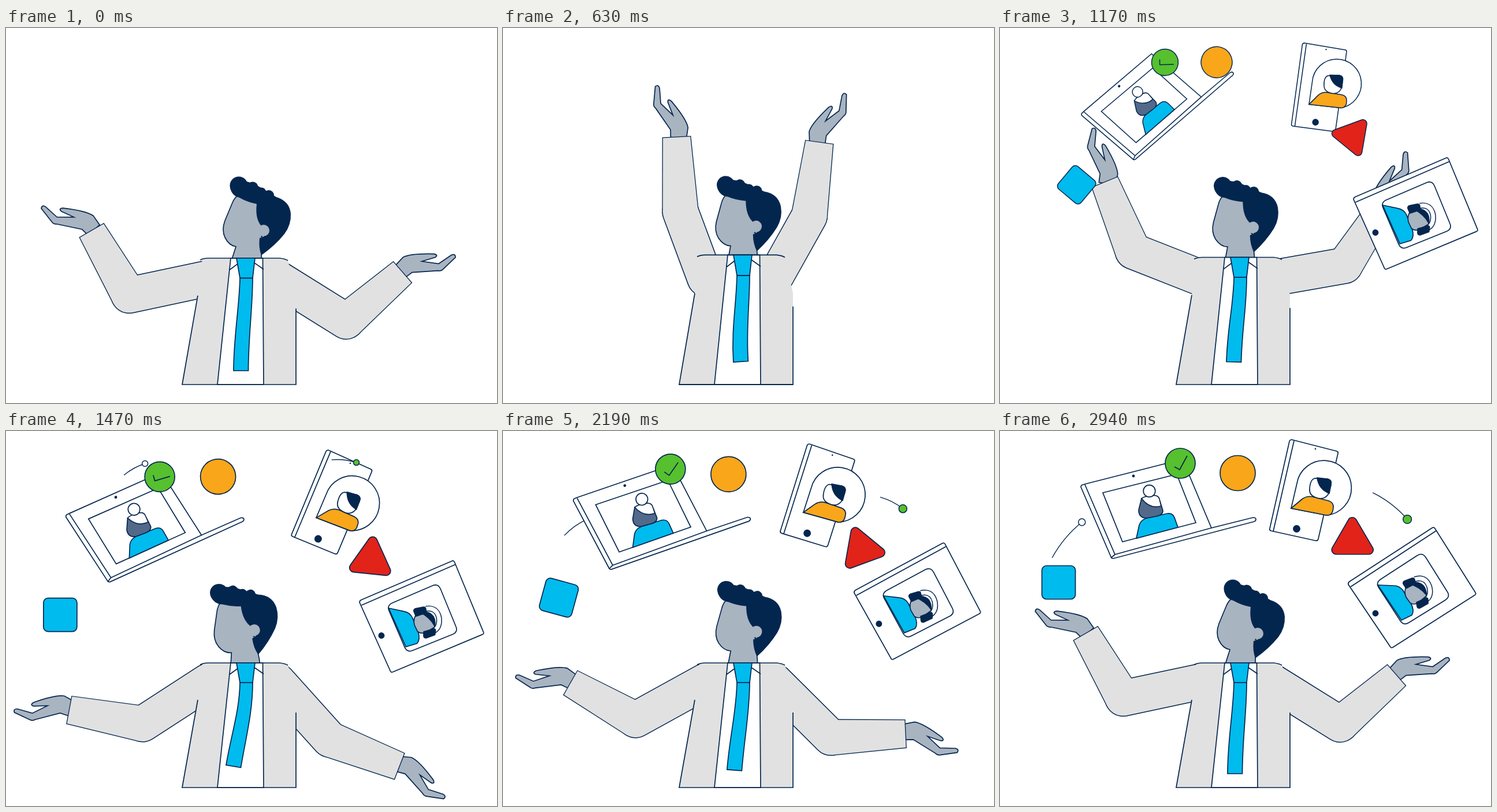
An HTML page with a canvas that plays this animation: 850x650 px, repeating every 4.5 s.

```html
<!DOCTYPE html>
<html lang="en">
<head>
<meta charset="utf-8">
<title>Juggling devices</title>
<style>
html, body { margin: 0; width: 100%; height: 100%; overflow: hidden; background: #fff; }
canvas { display: block; }
</style>
</head>
<body>
<canvas id="stage" width="850" height="650"></canvas>
<script>
const ctx = document.getElementById('stage').getContext('2d');
const NAVY = '#03264f', COAT = '#e1e1e1', SKIN = '#a9b4c1', CYAN = '#00bbee', ORANGE = '#faa61a',
  GREEN = '#56c02f', RED = '#e1231a', SLATE = '#53698a', WHITE = '#fff';
const LOOP = 4500, STEP = 30, END = 2940, LINE = 1.7;
const PIVOT = { x: 425, y: 335 };  // centre of the ring of floating things

const rad = degrees => degrees * Math.PI / 180;
const mix = (a, b, u) => a + (b - a) * u;
const ramp = (t, from, to) => Math.min(1, Math.max(0, (t - from) / (to - from)));
const ease = (t, from, to) => (1 - Math.cos(Math.PI * ramp(t, from, to))) / 2;
const bump = (t, from, to) => Math.sin(Math.PI * ramp(t, from, to)) ** 2;

// Arm gestures; each joint further out follows a little later.
const rise = (t, joint = 0) => ease(t, 200 + 60 * joint, 720 + 60 * joint);
const fall = (t, joint = 0) => ease(t, 930 + 60 * joint, 1410 + 60 * joint);
const spread = t => 1 - ease(t, 1580, 2760);

function shape(d, fill, line = LINE) {
  const path = typeof d === 'string' ? new Path2D(d) : d;
  if (fill) { ctx.fillStyle = fill; ctx.fill(path); }
  if (line) { ctx.strokeStyle = NAVY; ctx.lineWidth = line; ctx.stroke(path); }
}
function disc(x, y, r, fill, line = LINE) {
  const path = new Path2D();
  path.arc(x, y, r, 0, 7);
  shape(path, fill, line);
}
function group(draw) { ctx.save(); draw(); ctx.restore(); }

// Person
function drawHead(angle, lift) {
  group(() => {
    ctx.translate(415, 412 - lift);
    ctx.rotate(rad(angle));
    ctx.translate(-415, -412);
    shape('M404 288Q395 294 391 305L379 334Q373 350 379 363Q386 377 398 379L390 404L393 418H440L442 400L445 300Z', SKIN);
    disc(403, 273, 15.5, NAVY, 0);
    disc(427, 276, 9.5, NAVY, 0);
    disc(442, 285, 8.5, NAVY, 0);
    disc(455, 290, 9, NAVY, 0);
    shape('M388 277Q391 291 404 294Q418 302 434 305Q431 329 441 342L446 362L439 364Q437 380 442 394Q466 377 482 357Q494 341 493 322Q491 300 468 293L430 270L403 262Z', NAVY, 0);
    disc(446, 351, 10, SKIN, 0);
    shape('M441 361Q444 363 448 362', null, 1);
  });
}

function drawTorso(top, tie) {
  const k = (618 - top) / 216;
  group(() => {
    ctx.translate(0, 618);
    ctx.scale(1, k);
    ctx.translate(0, -618);
    shape('M340 402H475L488 405L502 466V618H305L332 466Z', COAT, 0);
    shape('M389 402H444.5L446 618H366Z', WHITE);
    shape('M336 405Q342 402 350 402H474Q483 403 488 406M332 466L305 618H502V488');
    shape('M387 422L402 411M430 410L446 421');
  });
  // The tail hangs square to its hem, which tilts as it swings.
  const knot = 618 - 182 * k, { x, y } = tie, tilt = (394 - x) / 3;
  const cx = x + tilt * 2.3, cy = y - 58;
  shape(`M405 ${knot}C404 ${knot + 50} ${cx} ${cy} ${x} ${y}L${x + 25.5} ${y + tilt}` +
    `C${cx + 25.5} ${cy + tilt} 427 ${knot + 50} 427 ${knot}Z`, CYAN);
  shape(`M399 ${top}H431L427 ${knot}H405Z`, CYAN);
}

// Joint angles in degrees: [at rest, raised, spread out] for upper arm, forearm and hand
const arms = [
  { side: -1, x: 350, joints: [[12, -76, 33], [-60, -93.5, -10], [-25, -92, 5]] },
  { side: 1, x: 470, joints: [[32, -68, 48], [-41, -92, 22], [-17, -86, 40]] }
];
const DIP = [0, 35, 25], RETURN = [1850, 1400, 1450];
const HAND = 'M-12 -12L1 -26Q14 -33 55 -32Q63 -30 57 -26L34 -19L63 -15L85 -30Q92 -33 92 -26L70 -5Q67 -2 62 -3L17 0L5 9Z';

function jointAngle([rest, up, out], joint, t) {
  const gesture = mix(mix(rest, up, rise(t, joint)), out, fall(t, joint));
  return rad(mix(gesture, rest, ramp(t, RETURN[joint], END) ** 1.4) + DIP[joint] * bump(t, 0, 400));
}

function drawArm({ side, x, joints }, t, raised) {
  const [upper, fore, hand] = joints.map((joint, i) => jointAngle(joint, i, t));
  const length = 140 - 18 * raised - 5 * fall(t) * spread(t);
  const ex = length * Math.cos(upper), ey = length * Math.sin(upper);
  const fx = Math.cos(fore), fy = Math.sin(fore);
  const wx = ex + 129 * fx, wy = ey + 129 * fy;
  const corner = (cx, cy, r) => `${cx - fy * r} ${cy + fx * r}`;
  const sleeve = new Path2D(`M${corner(ex, ey, 30.5)}L${corner(wx, wy, 23.7)}L${corner(wx, wy, -23.7)}L${corner(ex, ey, -30.5)}Z`);
  const bone = new Path2D(`M0 0L${ex} ${ey}`);
  const limb = (color, width) => {
    ctx.strokeStyle = color;
    ctx.lineWidth = width;
    ctx.lineCap = 'round';
    ctx.stroke(bone);
  };
  group(() => {
    ctx.translate(x, 434);
    ctx.scale(side, 1);
    group(() => {
      ctx.translate(wx, wy);
      ctx.rotate(hand + rad(17));
      shape(HAND, SKIN);
    });
    shape(sleeve, COAT, 2.6);
    limb(NAVY, 64);
    limb(COAT, 61);
    ctx.fillStyle = COAT;
    ctx.fill(sleeve);
  });
}

function drawPerson(t) {
  const raised = rise(t) * (1 - fall(t)), out = fall(t) * spread(t), nod = bump(t, 0, 840);
  drawHead(-14.5 * (nod + out), 4 * raised);
  arms.forEach(arm => drawArm(arm, t, raised));
  drawTorso(399 - 6 * rise(t) + 9 * fall(t),
    { x: 394 + 9 * raised - 13 * out - 7 * nod, y: 594 - 16 * raised - 15 * out });
}

// Devices and tokens, drawn in their resting places
function drawLaptop() {
  shape('M141 94L147 92L316 49L366 168L438 150Q443 150 443 153Q443 156 440 157L196 221Q193 221 192 218L140 97Z', WHITE);
  shape('M147 93L199 214L366 168M192 220L199 214');
  shape('M178 107L306 75L339 159L212 192Z', WHITE);
  disc(231, 78, 2.4, NAVY, 0);
  shape('M236 186L241 163Q244 154 254 151L290 143Q299 142 302 150L308 167Z', CYAN);
  shape('M245 117L240 137Q240 151 254 151L270 148Q282 146 282 138L277 122Z', SLATE);
  shape('M245 117Q250 113 262 112Q274 110 276 118L279 130Q260 136 245 117Z', WHITE);
  disc(258.5, 104, 10.3, WHITE);
}
function drawPhone() {
  shape('M505 15L583 35Q586 36 585 39L551 187Q550 191 546 190L469 173Q466 172 467 169L501 18Q502 15 505 15Z', WHITE);
  shape('M509 17L473 174');
  disc(546, 31, 1.3, NAVY, 0);
  disc(513.5, 169.5, 5.6, NAVY);
  shape('M504 134L514 91A47.5 47.5 0 1 1 565 146Z', WHITE);
  shape('M504 134L523 118Q531 112 541 114L569 121Q578 124 577 133L576 139Q573 147 565 146Z', ORANGE);
  shape('M545 82Q537 84 536 100Q535 111 546 115Q560 121 568 110L573 93Q575 85 567 83Z', WHITE);
  shape('M549 81L567 83Q575 85 573 93L570 108Q552 101 549 81Z', NAVY);
}
function drawTablet() {
  shape('M605 261L748 168Q751 166 753 169L823 280Q825 283 821 285L680 375Q677 377 675 373L603 266Q602 263 605 261Z', WHITE);
  shape('M607 270L755 173');
  disc(650, 316, 4.6, NAVY);
  shape('M659 257L722 216Q731 210 737 219L774 278Q780 287 771 293L708 332Q699 338 693 329L656 272Q650 263 659 257Z', WHITE);
  shape('M654 267L681 268Q692 268 698 277L711 298Q718 311 713 319L695 328Z', CYAN);
  const band = new Path2D('M718 257Q736 251 743 269Q748 286 736 294');
  shape(band, null, 10);
  ctx.strokeStyle = WHITE;
  ctx.lineWidth = 7;
  ctx.stroke(band);
  shape('M711 265L732 270Q739 276 738 286L724 298Q716 302 710 298L703 288Q699 279 703 270Z', SKIN);
  shape('M709 265Q724 259 733 268Q738 274 738 284Q728 271 709 265Z', NAVY);
  shape('M698 265Q697 262 700 260L713 255Q717 254 718 258L720 264L703 273ZM721 297L738 289Q741 289 741 293L741 299L727 307Q723 308 722 304Z', NAVY);
}
function drawTriangle() {
  const path = new Path2D('M610 157.5L582 206H638.5Z');
  ctx.lineJoin = 'round';
  for (const [color, width] of [[NAVY, 17.2], [RED, 13.8]]) {
    ctx.strokeStyle = color;
    ctx.lineWidth = width;
    ctx.stroke(path);
  }
  shape(path, RED, 0);
}
function drawBadge() {
  disc(312, 56, 26, GREEN);
  shape('M302 62L311 67L324 43');
}
function drawSquare() {
  const path = new Path2D();
  path.roundRect(72.5, 233.5, 58, 58, 8);
  shape(path, CYAN);
}

const items = [
  { draw: drawLaptop, x: 253, y: 135, side: -1, launch: 890, spin: 0 },
  { draw: drawBadge, x: 312, y: 56, side: -1, launch: 890, spin: 55 },
  { draw: () => disc(411.5, 73, 30.5, ORANGE), x: 411.5, y: 73, side: -1, launch: 890, spin: 0 },
  { draw: drawPhone, x: 537, y: 103, side: 1, launch: 885, spin: 0 },
  { draw: drawTriangle, x: 610, y: 190, side: 1, launch: 890, spin: -124 },
  { draw: drawTablet, x: 713, y: 271, side: 1, launch: 810, spin: 0 },
  { draw: drawSquare, x: 101.5, y: 262.5, side: -1, launch: 890, spin: 100 }
];

// Each item bursts from between the hands, then the two halves of the ring swing together.
function drawItem({ draw, x, y, side, launch, spin }, t) {
  const u = ramp(t, launch, launch + 330);
  if (!u) return;
  const swing = rad(9.8 * side * spread(t)), cos = Math.cos(swing), sin = Math.sin(swing);
  const dx = x - PIVOT.x, dy = y - PIVOT.y, flight = ease(u ** 1.5, 0, 1);
  group(() => {
    ctx.translate(mix(437, PIVOT.x + dx * cos - dy * sin, flight),
      mix(188, PIVOT.y + dx * sin + dy * cos, flight) - 70 * Math.sin(Math.PI * u));
    ctx.rotate(swing + rad(spin * ((END - t) / 1470) ** 2.4 - 108 * (1 - u)));
    ctx.scale(u ** .75, u ** .75);
    ctx.translate(-x, -y);
    draw();
  });
}

// A dot on the ring with a curved tail; angles run clockwise from the top.
function drawComet(angle, sweep, r, fill, tailShift) {
  const at = (degrees, radius) =>
    [PIVOT.x + radius * Math.sin(rad(degrees)), PIVOT.y - radius * Math.cos(rad(degrees))];
  const [x, y] = at(angle, 334), [tx, ty] = at(angle - sweep, 334 + tailShift);
  const dx = x - tx, dy = y - ty;
  shape(`M${tx} ${ty}Q${tx + dx / 2 + dy * .1} ${ty + dy / 2 - dx * .1} ${x} ${y}`, null, 1.4);
  disc(x, y, r, fill, 1.5);
}

function render(t) {
  ctx.fillStyle = WHITE;
  ctx.fillRect(0, 0, 850, 650);
  drawPerson(t);
  const tail = 13 * ease(t, 1950, 2400), firstTail = 7 * (1 - ease(t, 1500, 1930));
  if (t > 2100) drawComet(-58 + 2 * spread(t), tail, 6 * ease(t, 2100, 2350), WHITE, 20);
  items.forEach(item => drawItem(item, t));
  if (t > 1380) {
    if (t < 2100) drawComet(mix(-33.5, -7.6, (t - 1470) / 480), firstTail, 5 - 2 * ease(t, 1470, 1950), WHITE, 6);
    drawComet(57 * (1 - (1 - ramp(t, 824, 2670)) ** 2), tail + firstTail, 5 + 2.4 * ease(t, 1470, 2460), GREEN, -17);
  }
}

const start = performance.now();
function tick() {
  const t = (performance.now() - start) % LOOP;
  render(Math.min(Math.floor(t / STEP) * STEP, END));
  requestAnimationFrame(tick);
}
tick();
</script>
</body>
</html>
```
